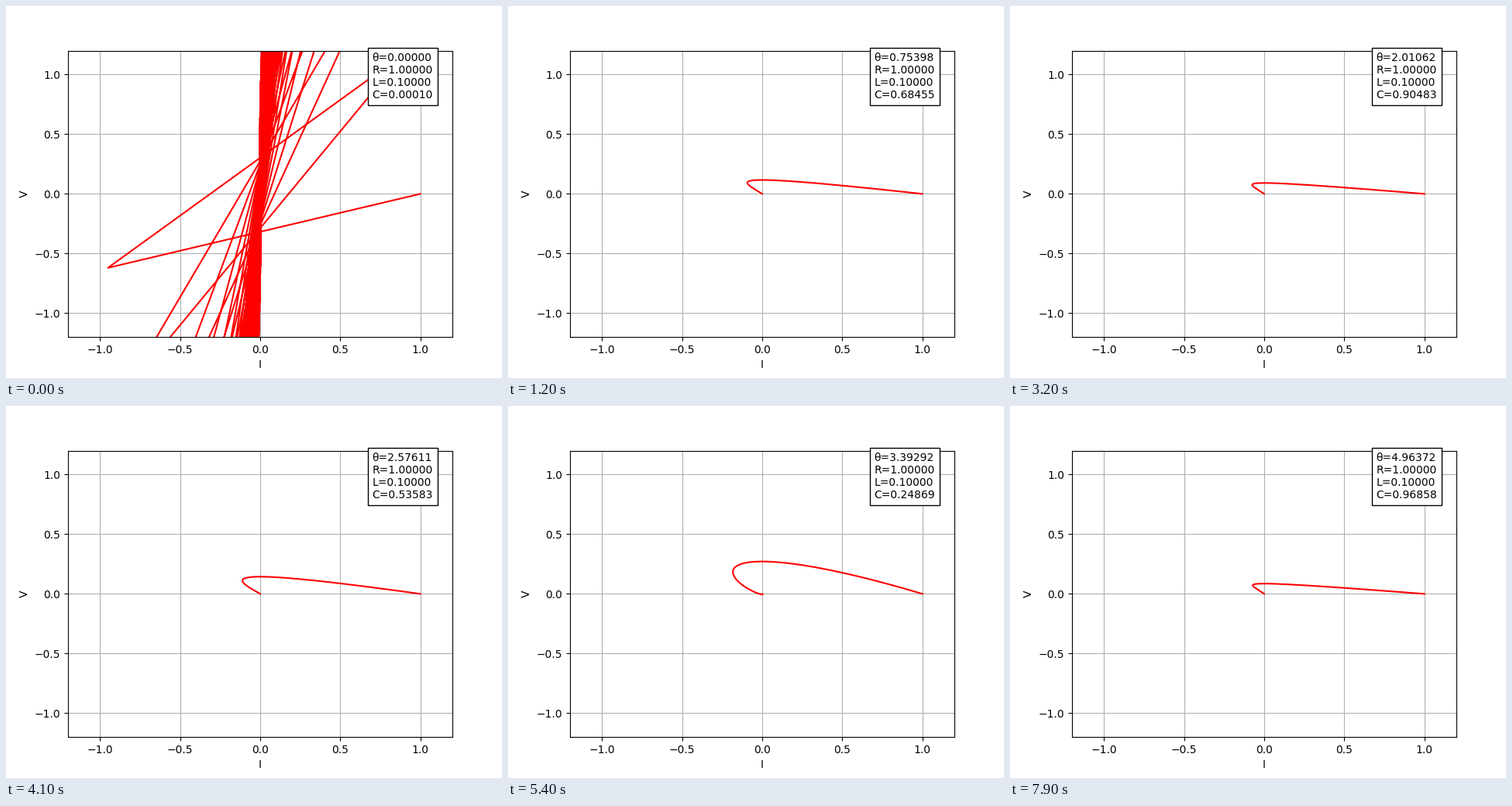
A matplotlib script for the animation above (8 s loop, 640 px wide and 480 px high).

```python
import numpy as np
import matplotlib.pyplot as plt
from matplotlib.animation import FuncAnimation

R, L = 1.0, 0.1
C_MIN = 1e-4
FRAMES, INTERVAL = 80, 100
STEP = 2 * np.pi / 100

t = np.linspace(0, 100, 10000)


def discharge(c):
    """Series RLC response for I(0) = 1, V(0) = 0."""
    a = R / (2 * L)
    s = np.sqrt(complex(a * a - 1 / (L * c)))
    p, q = -a + s, -a - s
    ep, eq = np.exp(p * t), np.exp(q * t)
    current = (p * ep - q * eq) / (2 * s)
    voltage = (ep - eq) / (2 * s * c)
    return current.real, voltage.real


fig, ax = plt.subplots(figsize=(6.4, 4.8), dpi=100)
ax.set(xlim=(-1.2, 1.2), ylim=(-1.2, 1.2), xlabel="I", ylabel="V")
ax.set_xticks(np.arange(-1, 1.1, 0.5))
ax.set_yticks(np.arange(-1, 1.1, 0.5))
ax.grid(True)
line, = ax.plot([], [], color="red", lw=1.5)
label = ax.text(0.7, 0.8, "", bbox=dict(facecolor="white", edgecolor="black"))


def update(i):
    theta = i * STEP
    c = max(abs(np.sin(theta)), C_MIN)
    line.set_data(*discharge(c))
    label.set_text(f"θ={theta:.5f}\nR={R:.5f}\nL={L:.5f}\nC={c:.5f}")
    return line, label


anim = FuncAnimation(fig, update, frames=FRAMES, interval=INTERVAL,
                     repeat=True, repeat_delay=0)
plt.show()
```
